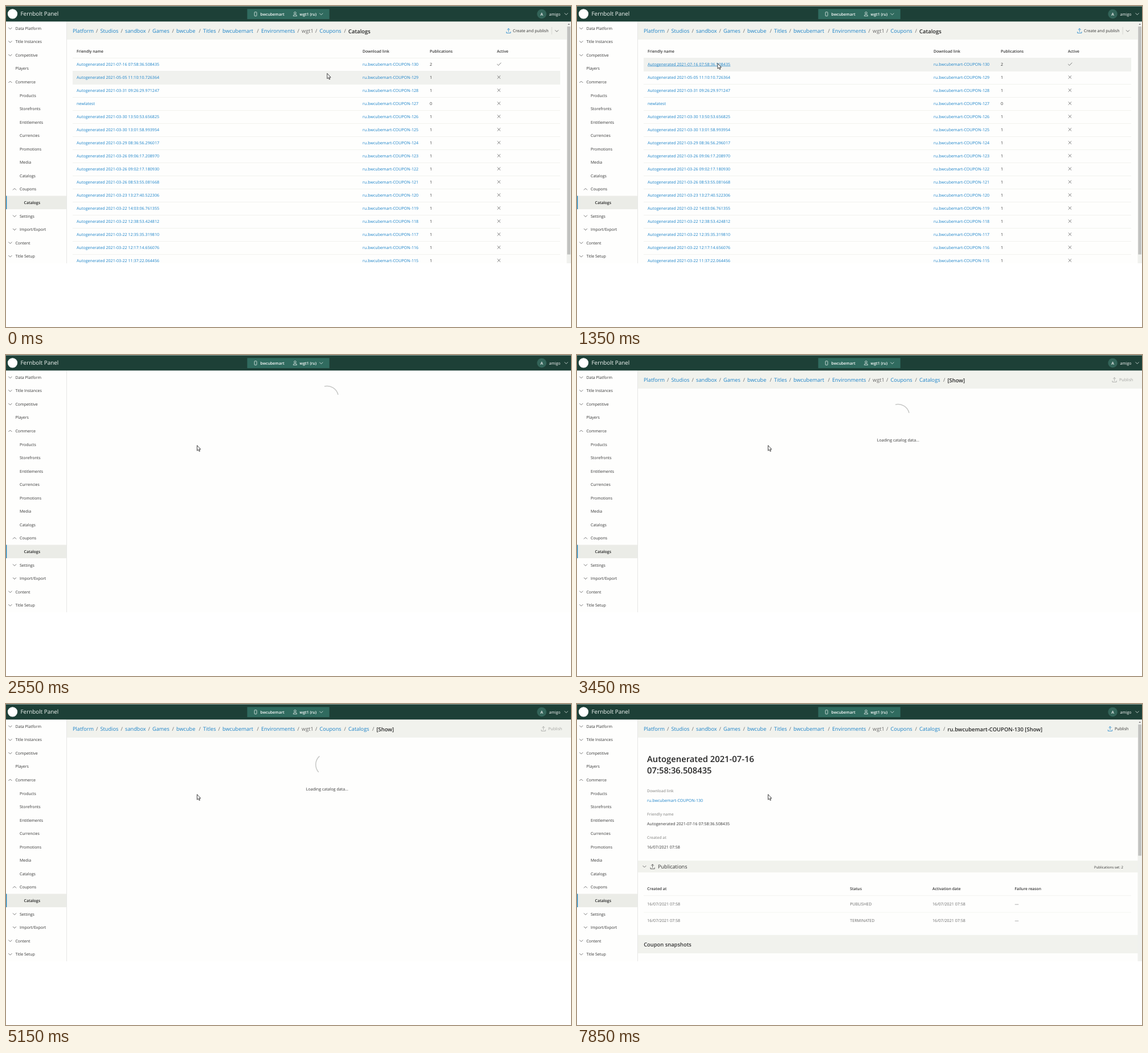
Recreate the animation shown at these times as an HTML page. Size 992x564 px, loop 8 s.

```html
<!DOCTYPE html>
<html lang="en">
<head>
<meta charset="utf-8">
<title>Coupon catalogs</title>
<style>
  html, body { margin: 0; width: 100%; height: 100%; overflow: hidden; background: #fff; }
  svg { display: block; width: 100%; height: 100%; }
  text { font-family: "Open Sans", "Noto Sans", sans-serif; text-rendering: geometricPrecision; white-space: pre; }
</style>
</head>
<body>
<svg id="stage" viewBox="0 0 992 564"></svg>
<script>
const LOOP = 8000;
const INK = '#343434', GREY = '#6b6b6b', LINK = '#1c83c9', BAR = '#f1f2ed', LINE = '#eeefec', PAPER = '#fefefd';
const SHOP = 'bwcubemart', GAME = 'bwcube', USER = 'amigo', BRAND = 'Fernbolt Panel';
const STAMP = '07:58:36.508435', DATE = '16/07/2021 07:58';

// Drawing helpers; y of a label is its vertical middle
const label = (x, y, s, { size = 7.14, fill = INK, weight = 400, anchor = 'start' } = {}) =>
  `<text x="${x}" y="${y + size * 0.36}" font-size="${size}" fill="${fill}" font-weight="${weight}" text-anchor="${anchor}">${s}</text>`;
const bold = (x, y, s, size = 6.8, fill = INK) => label(x, y, s, { size, fill, weight: 600 });
const link = (x, y, s, size = 7.14) => label(x, y, s, { size, fill: LINK });
const box = (x, y, w, h, fill, more = '') => `<rect x="${x}" y="${y}" width="${w}" height="${h}" fill="${fill}" ${more}/>`;
const stroke = (d, color = '#555', width = 0.8) => `<path d="${d}" fill="none" stroke="${color}" stroke-width="${width}"/>`;
const chevron = (x, y, up = false, color = '#555') => {
  const k = up ? -1.5 : 1.5;
  return stroke(`M${x - 3} ${y - k}L${x} ${y + k}L${x + 3} ${y - k}`, color);
};
const upload = (x, y, color) =>
  stroke(`M${x} ${y + 2}V${y - 4}M${x - 2.4} ${y - 1.6}L${x} ${y - 4}L${x + 2.4} ${y - 1.6}M${x - 3.6} ${y + 1.5}V${y + 4}H${x + 3.6}V${y + 1.5}`, color);
const group = (id, body) => `<g id="${id}">${body}</g>`;

function header() {
  return box(0, 0.5, 992, 26.8, '#1d4037') +
    '<circle cx="11.5" cy="13.8" r="8.6" fill="#fff"/>' +
    label(25.5, 13.8, BRAND, { size: 9.9, fill: '#f4f8f6' }) +
    box(423.5, 5.3, 144.3, 17.8, '#306b5f') +
    box(436.2, 10.6, 4, 7, 'none', 'rx=".8" stroke="#e6efec" stroke-width=".8"') +
    bold(446.5, 14.3, SHOP, 6.9, '#fff') +
    '<circle cx="507.5" cy="12.2" r="1.8" fill="none" stroke="#e6efec" stroke-width=".8"/>' +
    stroke('M504.3 17.6Q504.6 14.6 507.5 14.6T510.7 17.6Z', '#e6efec') +
    bold(515.5, 14.3, 'wgt1 (ru)', 6.9, '#fff') +
    chevron(553.4, 14.2, false, '#e6efec') +
    '<circle cx="940.6" cy="14" r="8.3" fill="#336459"/>' +
    label(940.6, 14, 'A', { size: 7, fill: '#fff', weight: 600, anchor: 'middle' }) +
    label(953.4, 14.3, USER, { size: 6.95, fill: '#fff' }) +
    chevron(983.6, 14, false, '#e6efec');
}

// Mark before each name: v closed, ^ open, - leaf; digit is the depth
function sidebar() {
  const items = ['v0Data Platform', 'v0Title Instances', 'v0Competitive', '-0Players', '^0Commerce',
    '-1Products', '-1Storefronts', '-1Entitlements', '-1Currencies', '-1Promotions', '-1Media', '-1Catalogs',
    '^1Coupons', '*2Catalogs', 'v1Settings', 'v1Import/Export', 'v0Content', 'v0Title Setup'];
  return items.map((item, i) => {
    const y = 39.3 + i * 23.55, x = 16.4 + item[1] * 7.6, mark = item[0], name = item.slice(2);
    if (mark === '*')
      return box(0, y - 11.9, 106, 23.5, '#ebece7') + box(0, y - 11.9, 1.3, 23.5, '#1781bd') + bold(x, y, name, 6.9, '#1e1e1e');
    return (mark === '-' ? '' : chevron(x - 9, y, mark === '^')) + label(x, y, name, { size: 7 });
  }).join('') + box(106, 27.3, 0.9, 425, '#e4e5e2');
}

function crumbs(last) {
  const xs = [117, 165.5, 209, 257, 299, 346, 380, 448, 519, 550.5, 601, 650.5];
  const names = ['Platform', 'Studios', 'sandbox', 'Games', GAME, 'Titles', SHOP, 'Environments', 'wgt1', 'Coupons', 'Catalogs'];
  if (last) names.push(last);
  return box(107, 27.3, 885, 31.7, BAR) + names.map((name, i) => {
    const x = xs[i], y = 44.1;
    const slash = i ? label(x - 5.8, y, '/', { size: 9.2, fill: GREY, anchor: 'middle' }) : '';
    if (i === names.length - 1) return slash + bold(x, y, name, 9.45, '#252525');
    return slash + (i === 8 ? label(x, y, name, { size: 9.2, fill: GREY }) : link(x, y, name, 9.2));
  }).join('');
}

const scrollbar = h => box(984.5, 27.3, 7.5, 425, '#f0f1ee') + box(985.3, 36, 5.6, h, '#c0c1bf') +
  '<path d="M986.3 33L988.2 30.8L990.1 33Z" fill="#777"/>';

const made = ['07-16 ' + STAMP, '05-05 11:10:10.726364', '03-31 09:26:29.971247', '',
  '03-30 13:50:53.656825', '03-30 13:01:58.993954', '03-29 08:36:56.296017', '03-26 09:06:17.208970',
  '03-26 09:02:17.180930', '03-26 08:53:55.081668', '03-23 13:27:40.522306', '03-22 14:03:06.761355',
  '03-22 12:38:53.424812', '03-22 12:35:35.319810', '03-22 12:17:14.656076', '03-22 11:37:22.064456'];
const ROW_TOP = 91.4, ROW = 23;

function list() {
  const rows = made.map((when, i) => {
    const y = 102.9 + i * ROW, iy = y - 0.9;
    const mark = i ? `M862.7 ${iy - 2.7}l5.4 5.4m0 -5.4l-5.4 5.4` : `M862.2 ${iy}l2.4 2.4l4.6 -4.8`;
    return box(117, ROW_TOP + i * ROW - 0.4, 856, 0.8, LINE) +
      link(124, y, when ? 'Autogenerated 2021-' + when : 'newlatest') +
      link(626, y, `ru.${SHOP}-COUPON-${130 - i}`) +
      label(744, y, i === 0 ? 2 : when ? 1 : 0) + stroke(mark, '#555', 0.75);
  }).join('');
  return crumbs() + upload(882.3, 43.5, LINK) + label(890, 43.6, 'Create and publish') +
    box(957.8, 37, 0.8, 13, '#d0d1ce') + chevron(967, 43.8) +
    box(117, 0, 856, ROW, '#f0f1ee', 'id="hover"') +
    bold(124, 79.3, 'Friendly name') + bold(626, 79.3, 'Download link') +
    bold(744, 79.3, 'Publications') + bold(862, 79.3, 'Active') + rows +
    box(124, 105.6, 145.5, 0.6, LINK, 'id="underline"') + scrollbar(400.5);
}

const loading = () => crumbs('[Show]') + upload(943.6, 43.5, '#a3a4a1') +
  label(952, 43.6, 'Publish', { fill: '#a3a4a1' }) +
  label(563.8, 149.6, 'Loading catalog data...', { size: 7.08, anchor: 'middle' });

function detail() {
  const cols = [123.3, 479.3, 624, 768.5];
  const field = (y, name) => bold(123, y, name, 6.75, '#9b9b99');
  const heads = ['Created at', 'Status', 'Activation date', 'Failure reason'].map((s, i) => bold(cols[i], 324.2, s)).join('');
  const rows = ['PUBLISHED', 'TERMINATED'].map((status, r) =>
    [DATE, status, DATE, '—'].map((s, i) => label(cols[i], 351.4 + r * 29.2, s, { fill: GREY })).join('')).join('');
  return crumbs(`ru.${SHOP}-COUPON-130 [Show]`) + upload(936, 43.5, LINK) + label(944, 43.6, 'Publish') +
    bold(123, 96.7, 'Autogenerated 2021-07-16', 14.8, '#252525') + bold(123, 116.7, STAMP, 14.8, '#252525') +
    field(152.5, 'Download link') + link(123, 169, `ru.${SHOP}-COUPON-130`) +
    field(193.7, 'Friendly name') + label(123, 210.2, 'Autogenerated 2021-07-16 ' + STAMP) +
    field(234.8, 'Created at') + label(123, 251.4, DATE) +
    box(107, 275.3, 878, 20.5, BAR) + chevron(118.4, 285.5) + upload(132.6, 285.7, '#444') +
    label(142, 285.7, 'Publications', { size: 9.1 }) + label(908, 286.5, 'Publications set: 2', { size: 6.05 }) +
    heads + rows + box(117, 336.4, 856, 0.7, LINE) + box(117, 365.7, 856, 0.7, LINE) +
    box(107, 405.8, 878, 32.2, BAR) + bold(117.2, 422.6, 'Coupon snapshots', 9.37) + scrollbar(230.5);
}

const stage = document.getElementById('stage');
stage.innerHTML = box(0, 0, 992, 564, '#fff') + box(0, 0, 992, 452, PAPER) +
  group('list', list()) + group('loading', loading()) + group('detail', detail()) +
  sidebar() + header() +
  '<path id="spin" d="M-14.1 -14.1A20 20 0 0 1 14.1 -14.1" fill="none" stroke="#c6c7c5" stroke-width="1.5"/>' +
  box(0, 452, 992, 112, '#fff') +
  '<path id="cursor" d="M0 0V9.3L2.1 7.4L3.6 10.6L5 10L3.6 6.9H6.3Z" fill="#fff" stroke="#222" stroke-width=".85" stroke-linejoin="round"/>';
const el = id => document.getElementById(id);
const show = (id, on) => el(id).setAttribute('display', on ? 'inline' : 'none');

// CSS-style cubic-bezier(.53, .21, .29, .67)
function spinEase(x) {
  const curve = (s, a, b) => 3 * (1 - s) ** 2 * s * a + 3 * (1 - s) * s * s * b + s ** 3;
  let lo = 0, hi = 1;
  for (let i = 0; i < 24; i++) {
    const mid = (lo + hi) / 2;
    if (curve(mid, 0.53, 0.29) < x) lo = mid; else hi = mid;
  }
  return curve(lo, 0.21, 0.67);
}

const smooth = (t, from, to) => {
  const k = Math.min(1, Math.max(0, (t - from) / (to - from)));
  return k * k * (3 - 2 * k);
};

const BLANK = 2200, SPIN = 2550, LOAD = 3250, DONE = 7500;

function draw(t) {
  const a = smooth(t, 30, 1330), b = smooth(t, 1920, 2250);
  const x = 563.9 - 316.9 * a + 88.5 * b, y = 118.4 - 17.6 * a + 58 * b;
  el('cursor').setAttribute('transform', `translate(${x} ${y})`);

  const row = Math.floor((y - ROW_TOP) / ROW);
  el('hover').setAttribute('y', ROW_TOP + row * ROW);
  show('underline', row === 0 && x < 269.5 && y > 98);

  show('list', t < BLANK);
  show('loading', t >= LOAD && t < DONE);
  show('detail', t >= DONE);
  show('spin', t >= SPIN && t < DONE);

  // The spinner restarts each time it is mounted
  const start = t < LOAD ? 2341 : t < 4315 ? 3241 : 4315;
  const turn = 360 * spinEase(Math.max(0, t - start) % 1300 / 1300);
  el('spin').setAttribute('transform', `translate(563.7 ${t < LOAD ? 74.5 : 106.5}) rotate(${turn})`);
}

const began = performance.now();
function tick() {
  draw((performance.now() - began) % LOOP);
  requestAnimationFrame(tick);
}
draw(0);
requestAnimationFrame(tick);
</script>
</body>
</html>
```
